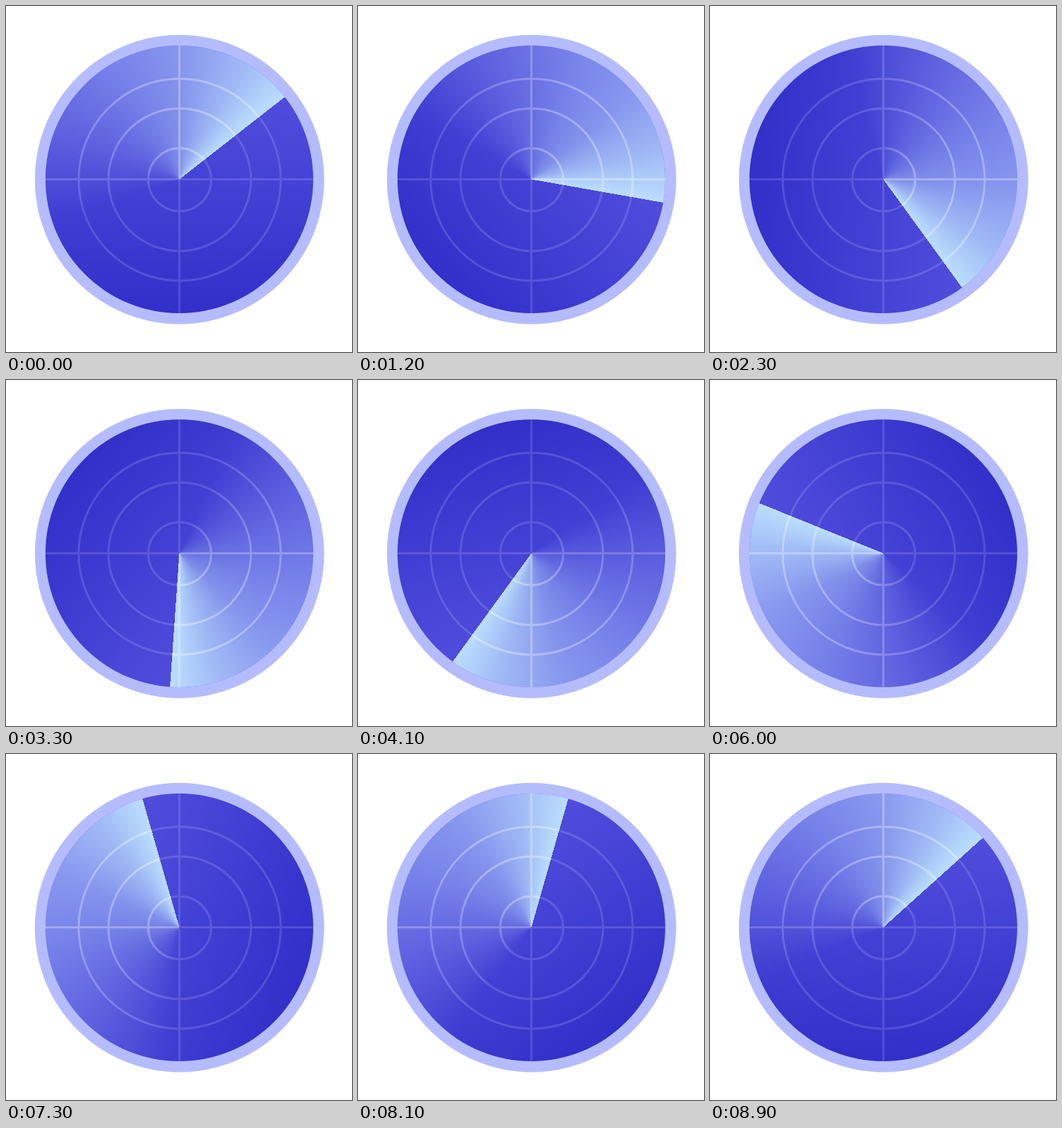
Recreate the animation shown at these times as an HTML page with a canvas. Size 500 by 500 pixels, loop 9000 ms.

```html
<!DOCTYPE html>
<html lang="en">
<head>
<meta charset="utf-8">
<title>Radar sweep</title>
<style>
  html, body { margin: 0; width: 100%; height: 100%; overflow: hidden; background: #fff; }
  canvas { display: block; width: 500px; height: 500px; }
</style>
</head>
<body>
<canvas id="stage" width="500" height="500"></canvas>
<script>
const ctx = document.getElementById('stage').getContext('2d');
const LOOP = 9000, STEP = 100, TAU = Math.PI * 2;
const C = 250.5, R = 193.5;
const rad = deg => deg * Math.PI / 180;

// [degrees behind the leading edge, opacity]
const GLOW = [[0, 0.96], [22, 0.71], [50, 0.47], [75, 0.36], [97, 0.26], [119, 0.17], [160, 0], [360, 0]];
const LINES = [[0, 0.33], [75, 0.29], [110, 0.24], [165, 0.14], [360, 0.14]];

function disc(r, fill, c = C) {
  ctx.beginPath();
  ctx.arc(c, c, r, 0, TAU);
  ctx.fillStyle = fill;
  ctx.fill();
}

function trail(lead, rgb, stops) {
  const g = ctx.createConicGradient(lead, C, C);
  for (const [deg, a] of stops) g.addColorStop(1 - deg / 360, `rgba(${rgb},${a})`);
  return g;
}

function base(lead) {
  const a = lead + rad(128);
  const dx = R * Math.cos(a), dy = R * Math.sin(a);
  const g = ctx.createLinearGradient(C - dx, C - dy, C + dx, C + dy);
  g.addColorStop(0, '#5754e1');
  g.addColorStop(1, '#322fca');
  return g;
}

function grid(style) {
  ctx.beginPath();
  for (const r of [45.5, 103, 146]) {
    ctx.moveTo(C + 0.5 + r, C + 0.5);
    ctx.arc(C + 0.5, C + 0.5, r, 0, TAU);
  }
  ctx.moveTo(C - R, C);
  ctx.lineTo(C + R, C);
  ctx.moveTo(C, C - R);
  ctx.lineTo(C, C + R);
  ctx.lineWidth = 3;
  ctx.strokeStyle = style;
  ctx.stroke();
}

function draw(t) {
  const lead = rad(-38 + 360 * Math.floor(t / STEP) * STEP / LOOP);
  ctx.clearRect(0, 0, 500, 500);
  disc(209, '#b5bcfe', 250.75);
  disc(R, base(lead));
  disc(R, trail(lead, '191,228,255', GLOW));
  grid(trail(lead, '255,255,255', LINES));
}

function frame() {
  draw(performance.now() % LOOP);
  requestAnimationFrame(frame);
}
frame();
</script>
</body>
</html>
```
